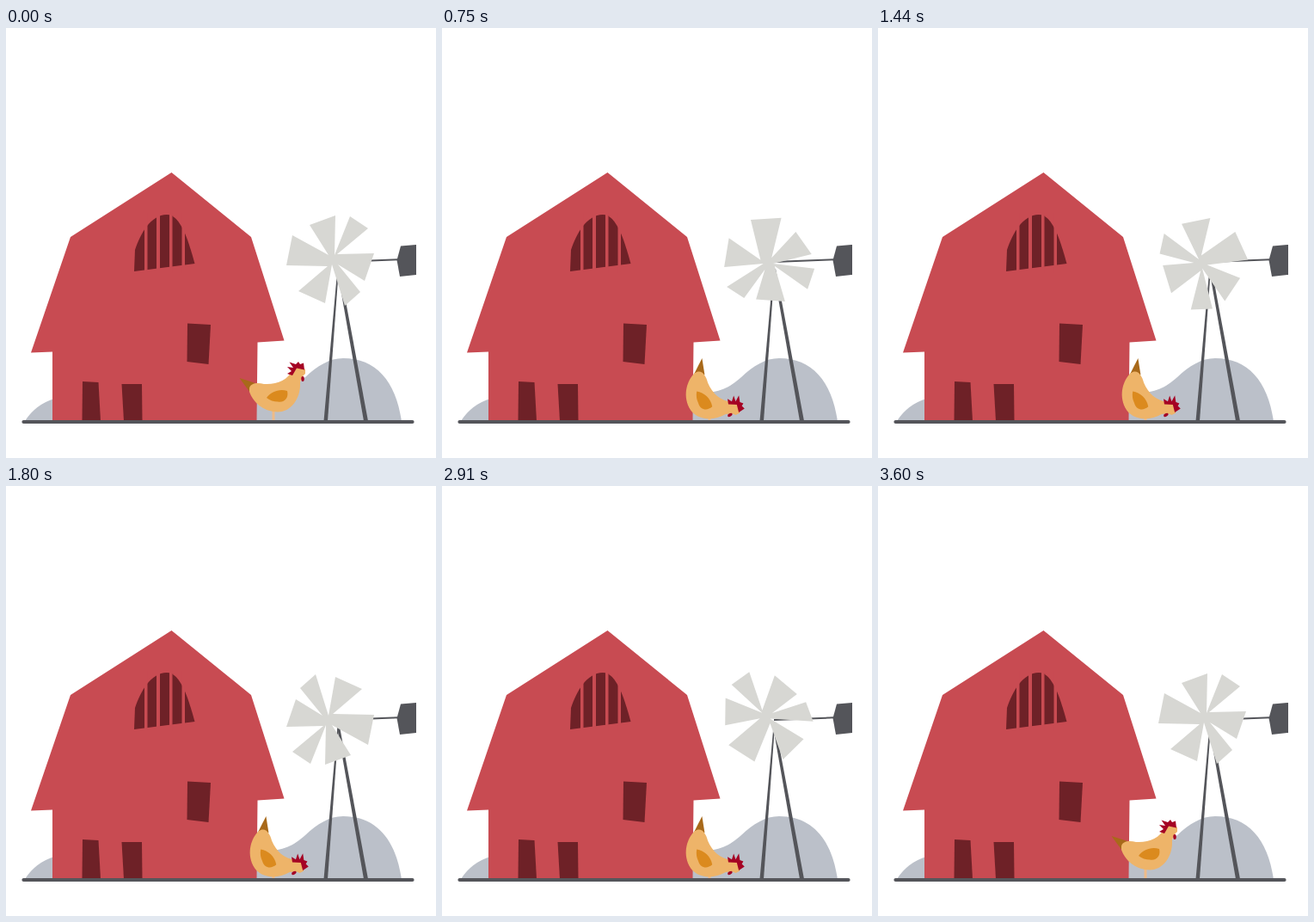
Animation, 500 px wide and 500 px high, one loop 3.63 s. Source, as an HTML page:

```html
<!DOCTYPE html>
<html lang="en">
<head>
<meta charset="utf-8">
<title>Farm</title>
<style>
  html, body { margin: 0; height: 100%; overflow: hidden; background: #fff; }
  svg { display: block; width: 100vw; height: 100vh; }
</style>
</head>
<body>
<svg viewBox="0 0 500 500">
  <g fill="#bbc0c9">
    <path d="M22 457Q34 438 56 431V457Z"/>
    <path d="M288 424C320 426 332 420 348 406C362 393 376 384 392 384C430 384 453 410 460 457H288Z"/>
  </g>

  <g fill="#54555a">
    <path d="M385.5 279H387L374 457H369.5Z"/>
    <path d="M385 280H388L421 457H416Z"/>
    <path d="M386 271L456 268.3V270.3L386 273Z"/>
    <path d="M459 253.5L477 252V287L458 289L454.5 270Z"/>
  </g>
  <path id="wheel" fill="#d7d7d3" d="M353 229L383 218L382 264L400 219L421 233L385 263L428 262L417 294L386 275L412 307L394 323L379 275L371 320L340 306L374 277L326 276L333 241L375 264Z"/>

  <path fill="#c84b52" d="M192.5 168L285 243L323.5 363.5L292.5 365.5L291.5 457H54V376.5L29 377.5L75 243Z"/>
  <g fill="#6e2127">
    <path d="M149 283L150 258C156 240 168 217 187 217C203 217 212 247 219.5 274Z"/>
    <path d="M211 343.5L238 345L235.5 391L210.5 388Z"/>
    <path d="M89 411L107.5 412L110 457H88.5Z"/>
    <path d="M134.5 414H158L158.5 457H137Z"/>
  </g>
  <path fill="#c84b52" d="M161 215h3.5v70h-3.5zM175 215h4v70h-4zM190 215h3.5v70h-3.5zM204.5 215h3.5v70h-3.5z"/>

  <path d="M311 442V457" stroke="#eebb88" stroke-width="3"/>
  <g id="hen">
    <path fill="#a8691a" d="M271.5 407L290 413L284 424Z"/>
    <path fill="#eeb469" d="M283 419C284 413 292 412 300 414C314 415 328 410 333 397C336 394 345 394 348 397V402Q344 405 342 412C343 430 332 446.5 316 446.5C298 446 287 434 283 423Z"/>
    <path fill="#db8a1e" d="M303 430C308 423 318 419 327 422C329 430 324 436 316 434.5Q309 434.5 303 430Z"/>
    <path fill="#a50324" d="M333 404L327 402L332 399L327 394L334 395L329.5 388.5L337 391L340 388L342 391L346 389.5L347 397.5L338 395.5Z"/>
    <ellipse fill="#a50324" cx="345" cy="408" rx="1.8" ry="3"/>
  </g>

  <path d="M20.5 458H472.5" stroke="#54555a" stroke-width="4.2" stroke-linecap="round"/>
</svg>
<script>
  const LOOP = 3630, TURN = 3600, STEP = 30;
  // Hen tilt: [time in ms, degrees]
  const tilts = [[0, 0], [650, 63], [2100, 63], [2450, 50], [2820, 63], [2950, 63], [3600, 0]];
  const wheel = document.getElementById('wheel');
  const hen = document.getElementById('hen');

  function tiltAt(t) {
    const i = Math.max(1, tilts.findIndex(([time]) => time >= t));
    const [t0, a] = tilts[i - 1], [t1, b] = tilts[i];
    const p = (t - t0) / (t1 - t0);
    return a + (b - a) * p * p * (3 - 2 * p);
  }

  function draw(now) {
    const t = Math.floor((now % LOOP) / STEP) * STEP;
    wheel.setAttribute('transform', `rotate(${360 * t / TURN} 377 271)`);
    hen.setAttribute('transform', `rotate(${tiltAt(t)} 305.7 420.7)`);
    requestAnimationFrame(draw);
  }
  draw(0);
</script>
</body>
</html>
```
